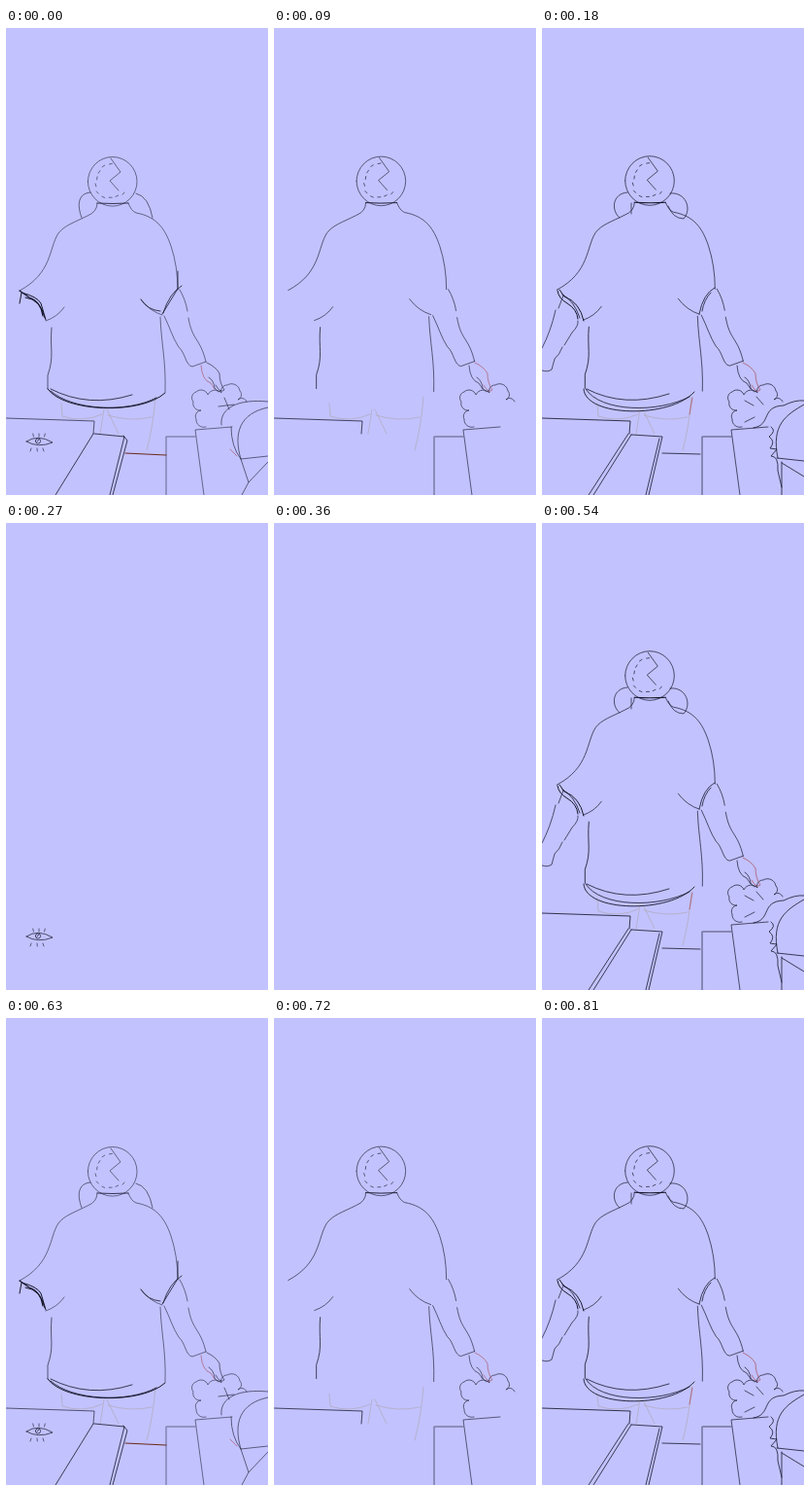
Recreate the animation shown at these times as an HTML page. Size 270x480 px, loop 0.9 s.

```html
<!DOCTYPE html>
<html lang="en">
<head>
<meta charset="utf-8">
<title>Walking sketch</title>
<style>
  html, body { margin: 0; width: 100%; height: 100%; overflow: hidden; background: #c2c2ff; }
  svg { display: block; width: 100vw; height: 100vh; }
  path { fill: none; stroke-linecap: round; stroke-linejoin: round; }
</style>
</head>
<body>
<svg id="stage" viewBox="0 0 270 480"></svg>
<script>
const stage = document.getElementById('stage');
const INK = '#17172b', TAN = '#aea7a9', RED = '#a84b52', BROWN = '#6b2a1c';
const STEP = 90;

function add(tag, parent, attrs) {
  const el = document.createElementNS('http://www.w3.org/2000/svg', tag);
  for (const k in attrs) el.setAttribute(k, attrs[k]);
  return parent.appendChild(el);
}

const layer = (parent = stage, attrs = { visibility: 'hidden' }) => add('g', parent, attrs);
const line = (g, d, width = .6, stroke = INK) => add('path', g, { d, stroke, 'stroke-width': width });
const circle = (x, y, r) => `M${x - r} ${y}a${r} ${r} 0 1 1 ${2 * r} 0a${r} ${r} 0 1 1 ${-2 * r} 0`;

// Outline of round bumps through a few points
const scallop = ([first, ...rest]) => {
  let [x, y] = first, d = `M${first}`;
  for (const [u, v] of rest) {
    const r = Math.hypot(u - x, v - y) * .6;
    d += `A${r} ${r} 0 0 1 ${u} ${v}`;
    [x, y] = [u, v];
  }
  return d;
};

function head(g, w) {
  line(g, circle(109.7, 157.8, 25.3), w);
  line(g, 'M108 134L118 148L107 157L116 167', w);
  for (let i = 0; i < 10; i++) {
    const a = .7 + i * .43, r = 17 + 1.5 * Math.sin(i * 5);
    const x = 109 + r * Math.cos(a), y = 158 + r * Math.sin(a);
    line(g, `M${x} ${y}l${-3 * Math.sin(a)} ${3 * Math.cos(a)}`, w);
  }
}

function shirt(g, w) {
  line(g, 'M94 180Q110 181 126 180', w * 1.5);
  line(g, 'M94 180Q94 189 84 193C70 200 60 203 54 211C44 226 48 252 14 270', w);
  line(g, 'M126 180Q129 188 134 190C156 194 164 207 170 224Q177 245 177 269', w);
  line(g, 'M41 301Q53 297 60 287M139 279Q148 291 161 295', w);
  line(g, 'M47 308C45 330 50 337 43 357V371', w * 1.2);
  line(g, 'M159 297C160 325 165 342 164 374', w);
}

function rightArm(g, w) {
  line(g, 'M179 269Q185 279 187 291M188 298C192 322 200 318 206 343', w);
  line(g, 'M163 296C169 308 172 319 178 328C185 334 185 347 192 348L206 343', w);
}

function hand(g, w, left, right) {
  line(g, 'M201 347Q202 362 211 365L215 371', w, left);
  line(g, 'M207 344Q216 348 220 355Q220 365 225 372Q221 376 216 367', w, right);
  line(g, 'M209 359Q214 362 215 370Q219 376 221 373', w);
}

const cabbage = scallop([
  [206, 410], [196, 402], [201, 393], [193, 384], [196, 374], [208, 377],
  [222, 375], [228, 367], [241, 373], [239, 382], [248, 384]
]);

// Everything the drawings share; t slides the figure between its two poses
function figure(g, t) {
  const w = .55 + .15 * t;
  const body = layer(g, { transform: `translate(${1.3 * t} ${-.8 * t})` });
  head(body, w);
  shirt(body, w);
  rightArm(body, w);
  line(g, 'M57 386L58 399Q79 406 99 397M105 398Q128 405 150 400', .6, TAN);
  line(g, 'M104 392L116 417M154 379Q152 408 145 434', .6, TAN);
  line(g, 'M101 392L97 417', .6, TAN);
  line(g, 'M0 401L91 404L90 417', w * 1.2);
  line(g, cabbage, w);
  line(g, 'M166 420H195M165 420V480', w);
  line(g, 'M233 410L195 413L204 480', w);
}

const first = layer();
figure(first, 0);
hand(first, .6, RED, INK);
line(first, 'M87 169C74 170 73 182 78 195M134 170Q147 173 151 195');
line(first, 'M14 283L16 272Q32 276 36 283L41 300M20 277Q36 279 40 298', 1);
line(first, 'M14 270L24 277Q36 281 38 296', 1.2);
line(first, 'M177 250V268L161 294M181 265Q168 273 162 293M139 279Q146 290 159 291', .8);
line(first, 'M43 371C60 395 139 398 164 375', 1);
line(first, 'M46 373C68 393 125 396 155 380M46 371Q85 391 130 377', .8);
line(first, 'M90 417L51 480M91 417L122 420L107 480M121 419L125 424L110 480', .8);
line(first, 'M123 437L165 439', 1.1, BROWN);
line(first, 'M219 389L235 387M225 380L230 392');
line(first, 'M222 408C220 390 240 381 270 384M270 390C241 396 234 416 242 443');
line(first, 'M232 410Q232 430 242 443L270 440M242 443L250 467L270 446M250 467L243 480');
line(first, 'M231 433L238 440', .6, RED);

const middle = layer();
figure(middle, .5);
hand(middle, .6, INK, RED);

const second = layer();
figure(second, 1);
hand(second, .7, INK, RED);
line(second, 'M88 169C72 170 71 188 80 195M132 170C148 168 155 186 146 196Q135 196 130 183M92 180V191', .7);
line(second, 'M16 270Q17 278 26 283Q36 289 37 299M18 269L23 276Q39 282 43 301', 1);
line(second, 'M21 274Q33 280 39 298M178 267Q166 273 162 294M174 272Q167 279 165 291', .8);
line(second, 'M43 371C44 400 132 402 157 374', .9);
line(second, 'M45 371C60 395 120 396 152 379M46 371Q85 391 131 376', .8);
line(second, 'M155 380L152 397', .7, RED);
line(second, 'M89 417L48 480M92 418L53 480M92 418L124 420L110 480M121 422L107 480', .8);
line(second, 'M124 437L163 438', .8);
line(second, 'M209 383L218 388M221 379L228 387M209 405L219 400', .7);
line(second, 'M218 411C237 408 225 389 249 388Q261 382 270 383M270 387C251 398 236 408 243 442', .8);
line(second, 'M236 410Q242 414 234 420Q241 425 235 432L242 433L236 440Q244 440 243 455L247 472', .8);
line(second, 'M242 442L270 445M247 446V480M247 447L270 461', .8);

const eye = layer();
line(eye, 'M21 425Q33 417 48 426Q33 432 21 425' + circle(33, 424.5, 2.6) + 'M32 425L34 423', .7);
for (const i of [-1, 0, 1])
  line(eye, `M${34 + 5.5 * i} 420l${.8 * i} -3M${32 + 6 * i} 432l${i || .3} 3`);

const arm = layer();
line(arm, 'M22 275L17 288M14 290Q9 312 0 329', .7);
line(arm, 'M37 301Q38 306 31 313L23 326M21 328Q18 336 13 340L10 351Q6 354 0 352', .7);

const layers = [first, middle, second, eye, arm];
const steps = [
  [first, eye], [middle], [second, arm], [eye], [],
  [arm], [second, arm], [first, eye], [middle], [second, arm]
];

function draw() {
  const shown = steps[Math.floor(performance.now() / STEP) % steps.length];
  for (const g of layers) g.setAttribute('visibility', shown.includes(g) ? 'visible' : 'hidden');
  requestAnimationFrame(draw);
}
draw();
</script>
</body>
</html>
```
